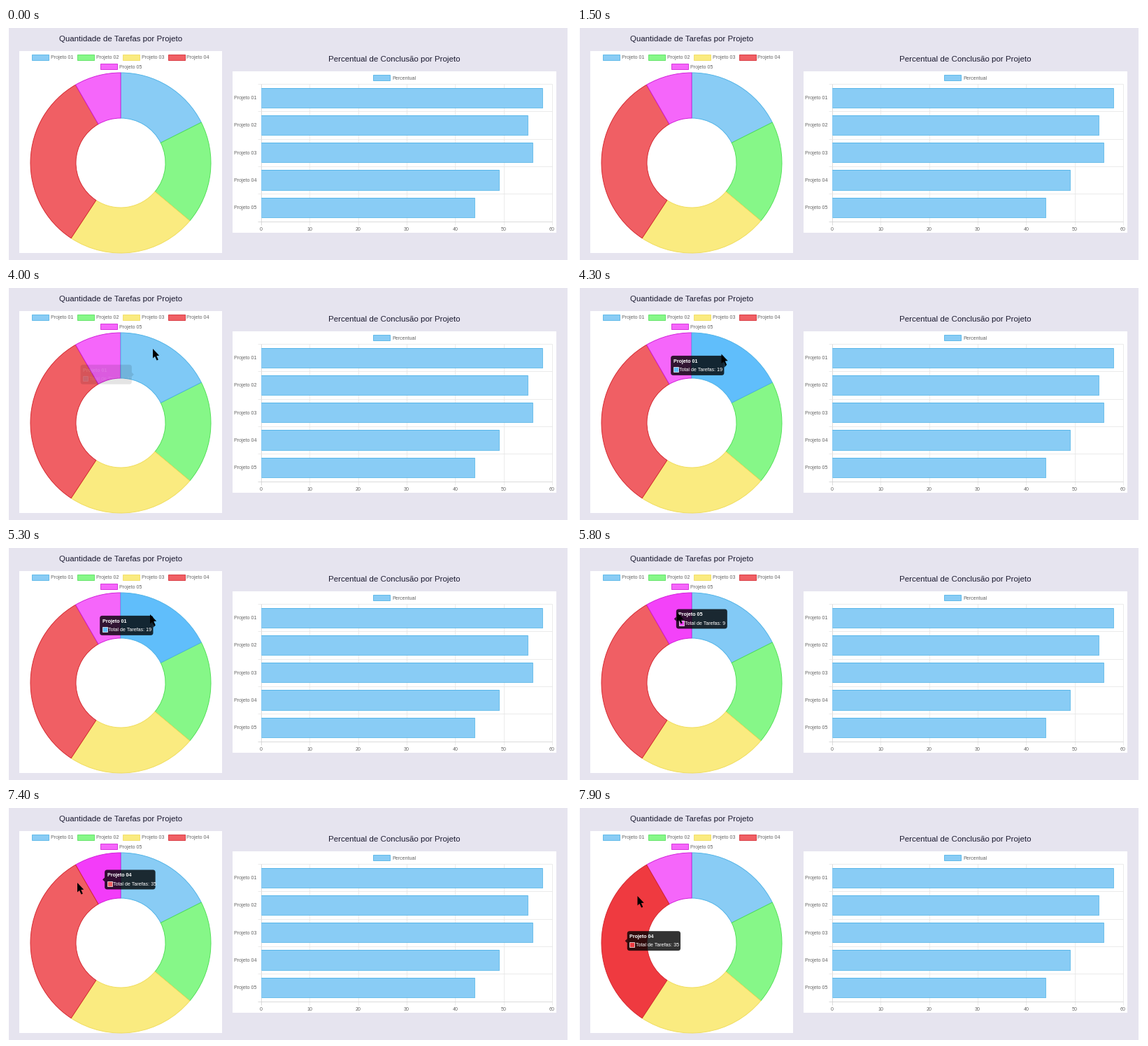
Animation of 808 by 332 pixels, one loop 8 s. Source, as a matplotlib script:

```python
import numpy as np
import matplotlib.pyplot as plt
from matplotlib.animation import FuncAnimation
from matplotlib.colors import to_rgb
from matplotlib.patches import FancyBboxPatch, Polygon, Rectangle, Wedge

W, H, DPI = 808, 332, 100
INTERVAL, FRAMES = 100, 80
PX = 72 / DPI  # points per pixel
SMALL, TITLE = 7.15, 11.5

NAMES = [f"Projeto {i:02d}" for i in range(1, 6)]
TASKS = [19, 20, 25, 35, 9]
PERCENT = [58, 55, 56, 49, 44]
FILL = ["#89ccf5", "#86f788", "#faeb80", "#f05f64", "#f566fa"]
HOVER = ["#60befb", "#5cf760", "#fae550", "#ef3a40", "#f33bf9"]
EDGE = ["#4bb1e6", "#4fdf55", "#f0dc5a", "#d3242c", "#cf1ad6"]

CENTER, OUTER, INNER = (164, 193), 129, 64

plt.rcParams["font.family"] = "Liberation Sans"
fig = plt.figure(figsize=(W / DPI, H / DPI), dpi=DPI, facecolor="white")
ax = fig.add_axes([0, 0, 1, 1])
ax.set(xlim=(0, W), ylim=(H, 0))
ax.axis("off")


def rect(x0, y0, x1, y1, color, edge="none", lw=0.8, z=1):
    return ax.add_patch(Rectangle((x0, y0), x1 - x0, y1 - y0, facecolor=color,
                                  edgecolor=edge, lw=lw * PX, zorder=z))


def label(x, y, text, size=SMALL, color="#666666", ha="left", z=4, **kw):
    return ax.text(x, y, text, fontsize=size * PX, color=color, ha=ha,
                   va="baseline", zorder=z, **kw)


def line(xs, ys, color, lw=0.8, z=2):
    ax.plot(xs, ys, color=color, lw=lw * PX, zorder=z, solid_capstyle="butt")


def legend_item(x, y, text, i):
    rect(x, y - 3.6, x + 24, y + 3.6, FILL[i], EDGE[i])
    label(x + 27, y + 2.5, text)


# Backgrounds and titles
rect(4, 0, 803, H, "#e6e4ef", z=0)
rect(19, 33, 309, 322, "white")
rect(324, 62, 787, 293, "white")
label(164.5, 18.7, "Quantidade de Tarefas por Projeto", TITLE, "#1b1a30", "center")
label(555.5, 47.8, "Percentual de Conclusão por Projeto", TITLE, "#1b1a30", "center")

# Doughnut chart
for i, (x, y) in enumerate([(37, 42), (102, 42), (166.5, 42), (231.5, 42), (134.5, 55)]):
    legend_item(x, y, NAMES[i], i)

bounds = np.concatenate([[0], np.cumsum(TASKS)]) / sum(TASKS) * 360 - 90
wedges = [ax.add_patch(Wedge(CENTER, OUTER, a, b, width=OUTER - INNER,
                             facecolor=FILL[i], edgecolor=EDGE[i],
                             lw=0.9 * PX, zorder=3))
          for i, (a, b) in enumerate(zip(bounds, bounds[1:]))]

# Bar chart
X0, X1, Y0, Y1 = 365, 781, 80, 276.5
ROW = (Y1 - Y0) / 5
legend_item(525, 71, "Percentual", 0)
for v in range(0, 61, 10):
    x = X0 + (X1 - X0) * v / 60
    line([x, x], [Y0, Y1 + 5], "#d2d2d2" if v == 0 else "#e6e6e6")
    label(x, 289.8, str(v), ha="center")
for k in range(6):
    y = Y0 + k * ROW
    line([X0 - 5, X1], [y, y], "#d2d2d2" if k == 5 else "#e6e6e6")
for k, value in enumerate(PERCENT):
    yc = Y0 + (k + 0.5) * ROW
    top, bottom = yc - 0.36 * ROW, yc + 0.36 * ROW
    right = X0 + (X1 - X0) * value / 60
    rect(X0, top, right, bottom, FILL[0], z=3)
    line([X0, right, right, X0], [top, top, bottom, bottom], EDGE[0], z=3)
    label(358.5, yc + 2.5, NAMES[k], ha="right")

# Tooltip and pointer
TIP_H = 28
box = ax.add_patch(FancyBboxPatch((0, 0), 70, TIP_H, facecolor="black", lw=0, zorder=6,
                                  boxstyle="round,pad=0,rounding_size=3.6"))
caret = ax.add_patch(Polygon([(0, 0)] * 3, facecolor="black", lw=0, zorder=6))
swatch = rect(0, 0, 7, 7, "white", "white", 0.7, z=7)
tip_title = label(0, 0, "", color="white", z=7, weight="bold")
tip_body = label(0, 0, "", color="white", z=7)

ARROW = np.array([(0, 0), (0, 13.5), (3, 10.9), (5.6, 16.6), (7.8, 15.6),
                  (5.3, 10), (9.2, 9.7)])
pointer = ax.add_patch(Polygon(ARROW, facecolor="black", lw=0, zorder=9))

# Pointer path: time, x, y
PATH = np.array([(3400, 224, -20), (3500, 224, -9), (3700, 222, 14), (3900, 215, 58),
                 (4000, 210, 87), (4200, 207, 94), (4400, 206, 95), (5300, 206, 95),
                 (5400, 200, 95), (5650, 163, 93), (5800, 143, 92), (6000, 137.5, 92),
                 (7000, 137.5, 92), (7100, 134, 93), (7300, 115, 101), (7400, 102, 107),
                 (7600, 92, 119), (7900, 86.5, 126)])

# Time at which a slice becomes hovered, and its index
HOVERS = [(3974, 0), (5650, 4), (7397, 3)]
TIP_START = np.array([98, 127.7, 72.4])


def ease(t, start, duration=400):
    p = np.clip((t - start) / duration, 0, 1)
    return 1 - (1 - p) ** 4


def tip_target(i):
    """Left edge, vertical centre and width of the tooltip for a slice."""
    mid = np.radians((bounds[i] + bounds[i + 1]) / 2)
    r = (OUTER + INNER) / 2
    x, y = CENTER[0] + r * np.cos(mid), CENTER[1] + r * np.sin(mid)
    width = 76.3 if TASKS[i] > 9 else 72.4
    return np.array([x - 4.2 - width if i == 0 else x + 4.2, y, width])


def highlight(t, i):
    level = 0
    for k, (start, index) in enumerate(HOVERS):
        if index == i:
            end = HOVERS[k + 1][0] if k + 1 < len(HOVERS) else np.inf
            level = ease(t, start) * (1 - ease(t, end))
    return level


def draw_tooltip(t, active):
    alpha = np.clip((t - HOVERS[0][0]) / 200, 0, 1)
    for artist in (box, caret, swatch, tip_title, tip_body):
        artist.set_visible(active is not None)
    if active is None:
        return
    state = TIP_START
    for start, i in HOVERS:
        state = state + (tip_target(i) - state) * ease(t, start)
    left, yc, width = state
    top = yc - TIP_H / 2
    box.set_bounds(left, top, width, TIP_H)
    edge, tip = (left + width, 3) if active == 0 else (left, -3)
    caret.set_xy([(edge, yc - 3), (edge + tip, yc), (edge, yc + 3)])
    swatch.set_xy((left + 3.7, top + 16.2))
    swatch.set_facecolor(wedges[active].get_facecolor())
    tip_title.set_position((left + 3.6, top + 10))
    tip_title.set_text(NAMES[active])
    tip_body.set_position((left + 12, top + 22.2))
    tip_body.set_text(f"Total de Tarefas: {TASKS[active]}")
    for artist in (box, caret):
        artist.set_alpha(0.8 * alpha)
    for artist in (swatch, tip_title, tip_body):
        artist.set_alpha(alpha)


def update(frame):
    t = frame * INTERVAL
    active = next((i for start, i in reversed(HOVERS) if t >= start), None)
    for i, wedge in enumerate(wedges):
        base, hover = np.array(to_rgb(FILL[i])), np.array(to_rgb(HOVER[i]))
        wedge.set_facecolor(base + (hover - base) * highlight(t, i))
        wedge.set_zorder(3.5 if i == active else 3)
    draw_tooltip(t, active)
    pos = [np.interp(t, PATH[:, 0], PATH[:, k]) for k in (1, 2)]
    pointer.set_xy(ARROW + pos)
    return []


anim = FuncAnimation(fig, update, frames=FRAMES, interval=INTERVAL,
                     init_func=lambda: update(0), repeat=True, repeat_delay=0)
plt.show()
```
